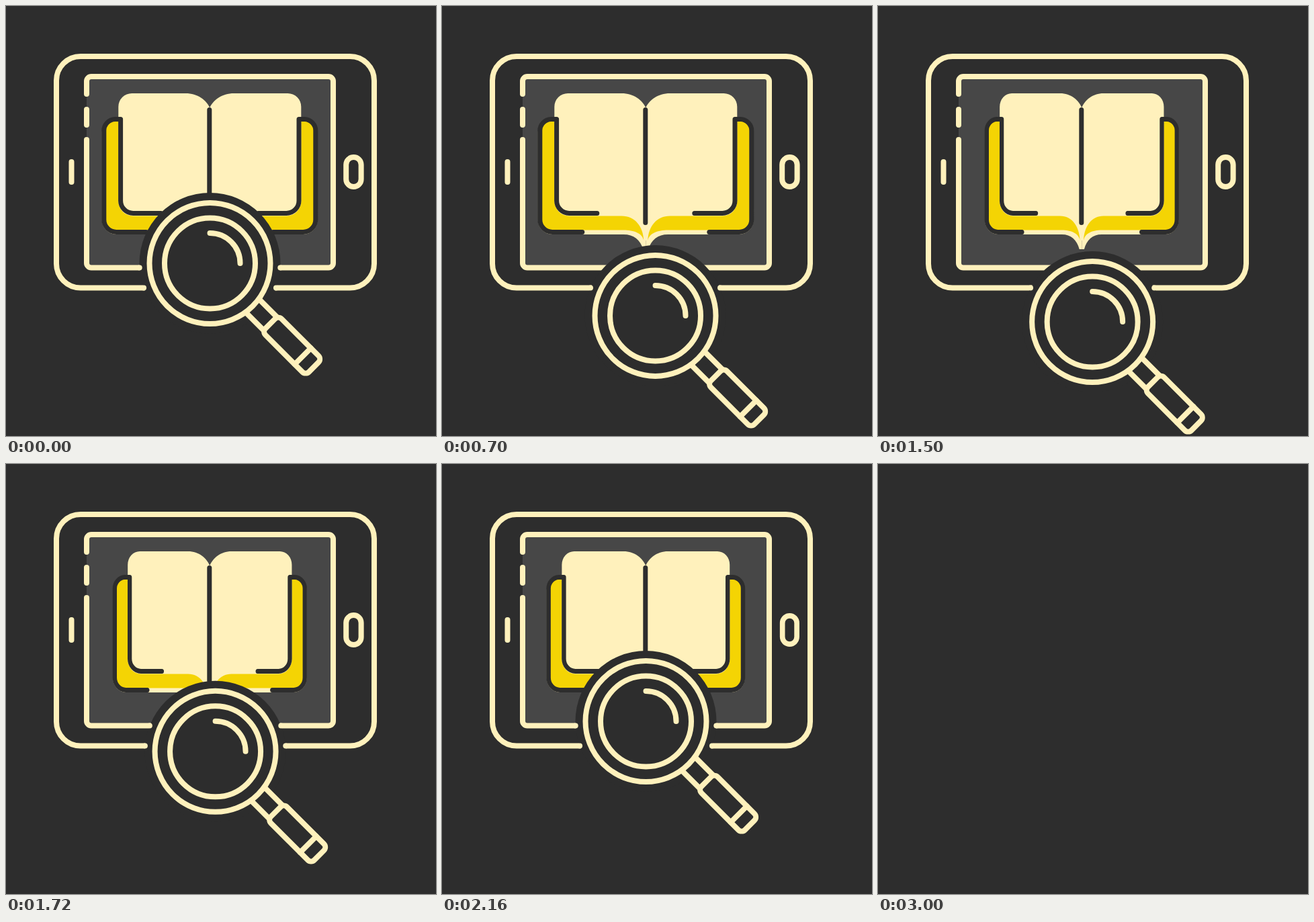
Animation, 640 px wide and 640 px high, one loop 3020 ms. Source, as an HTML page:

```html
<!DOCTYPE html>
<html lang="en">
<head>
<meta charset="utf-8">
<title>Searching an e-book</title>
<style>
  html, body { margin: 0; width: 100%; height: 100%; overflow: hidden; background: #2d2d2d; }
  svg { display: block; width: 100%; height: 100%; }
  .dark { fill: #2d2d2d; }
  .cream { fill: #fff1bc; }
  .yellow { fill: #f4d404; }
  .line { fill: none; stroke: #fff1bc; stroke-width: 8; stroke-linecap: round; stroke-linejoin: round; }
  .ink { fill: none; stroke: #2d2d2d; stroke-width: 7; stroke-linecap: round; stroke-linejoin: round; }
</style>
</head>
<body>
<svg viewBox="0 0 640 640">
  <defs>
    <!-- One half of the book, measured outwards from the spine -->
    <g id="half">
      <path class="cream" d="M0 168H141A19.5 19.5 0 0 1 160.5 188V318A21.5 21.5 0 0 1 139 340H33C18 340 8 348 4 362H0Z"/>
      <path class="yellow" d="M130 169H141A17 17 0 0 1 158 186V318A17 17 0 0 1 141 333.5H33C18 333.5 5 338 3 349L0 300H130Z"/>
      <path class="cream" d="M-.3 152C5 140 18 130 36 130H116A20 20 0 0 1 136 150V290A22 22 0 0 1 114 312.5H36C16 312.5 4 328 3 349H-.3Z"/>
      <path class="ink outline"/>
    </g>
  </defs>
  <g id="scene">
    <rect class="line" x="75" y="75" width="473" height="344.5" rx="36"/>
    <path class="line" d="M97.5 232V262"/>
    <rect class="line" id="button" x="506.2" y="225" width="22.4" height="44" rx="11.2"/>
    <rect x="120" y="105" width="367" height="284.5" rx="7" fill="#474747"/>
    <path class="line" d="M120 131V112a7 7 0 0 1 7-7H480a7 7 0 0 1 7 7V382.5a7 7 0 0 1-7 7H127a7 7 0 0 1-7-7V199M120 154V177"/>
    <use class="side" href="#half"/>
    <use class="side" href="#half"/>
    <path class="ink" d="M302.8 154.5V322.5"/>
    <circle class="dark" id="halo" r="105"/>
    <g id="caps"></g>
    <g id="glass">
      <circle class="line" r="90"/>
      <circle class="line" r="67.5"/>
      <path class="line" d="M0-45A45 45 0 0 1 45 0"/>
      <g transform="rotate(45)">
        <path class="line" d="M92-14H127M92 14H127M195.5-17V17"/>
        <rect class="line" x="127" y="-17" width="91.5" height="34" rx="7"/>
      </g>
    </g>
  </g>
</svg>
<script>
const LOOP = 3020, BLANK = 3000;
const SPINE = 303.3, HALO = 105;
const EDGES = [389.5, 419.5];

const $ = id => document.getElementById(id);
const set = (node, attrs) => {
  for (const key in attrs) node.setAttribute(key, attrs[key]);
};
const ease = (t, from, to) => {
  const p = Math.min(1, Math.max(0, (t - from) / (to - from)));
  return p * p * (3 - 2 * p);
};

const sides = document.querySelectorAll('.side');
const outline = document.querySelector('.outline');

// Rounded line ends where the halo cuts the tablet's lower edges
const caps = EDGES.flatMap(y => [-1, 1].map(side => {
  const node = document.createElementNS('http://www.w3.org/2000/svg', 'circle');
  set(node, { class: 'cream', cy: y });
  $('caps').append(node);
  return { node, y, side };
}));

function drawBook(t) {
  const width = 1 - 0.102 * (ease(t, 740, 1520) - ease(t, 1860, 2900));
  sides.forEach((node, i) =>
    set(node, { transform: `translate(${SPINE} 0) scale(${i ? width : -width} 1)` }));

  const trim = ease(t, 1300, 1700) - ease(t, 1940, 2300);
  set(outline, {
    d: `M${72.5 + 7 * trim} 308.5H114A18.7 18.7 0 0 0 132.7 290V168.5H141` +
       `A17 17 0 0 1 157.5 186V318A18.5 18.5 0 0 1 139 336.5H${94.5 + 9 * trim}`
  });
}

function drawGlass(t) {
  const drop = 82 * ease(t, 227, 774) + 5 * ease(t, 1300, 1508) - 87 * ease(t, 1508, 1941);
  const x = 303.5 + 0.18 * drop, y = 383 + drop;
  set($('glass'), { transform: `translate(${x} ${y})` });
  set($('halo'), { cx: x, cy: y });
  for (const cap of caps) {
    const reach = Math.sqrt(HALO ** 2 - (cap.y - y) ** 2);
    set(cap.node, { cx: x + cap.side * reach, r: reach > 90 ? 4 : 0 });
  }
}

function drawButton(t) {
  const scale = 1 - 0.05 * (ease(t, 1850, 2100) - ease(t, 2100, 2350));
  set($('button'), { transform: `translate(517.4 247) scale(${scale}) translate(-517.4 -247)` });
}

function render(t) {
  set($('scene'), { visibility: t < BLANK ? 'visible' : 'hidden' });
  drawBook(t);
  drawGlass(t);
  drawButton(t);
}

let start;
function tick(now) {
  start ??= now;
  render((now - start) % LOOP);
  requestAnimationFrame(tick);
}
render(0);
requestAnimationFrame(tick);
</script>
</body>
</html>
```
